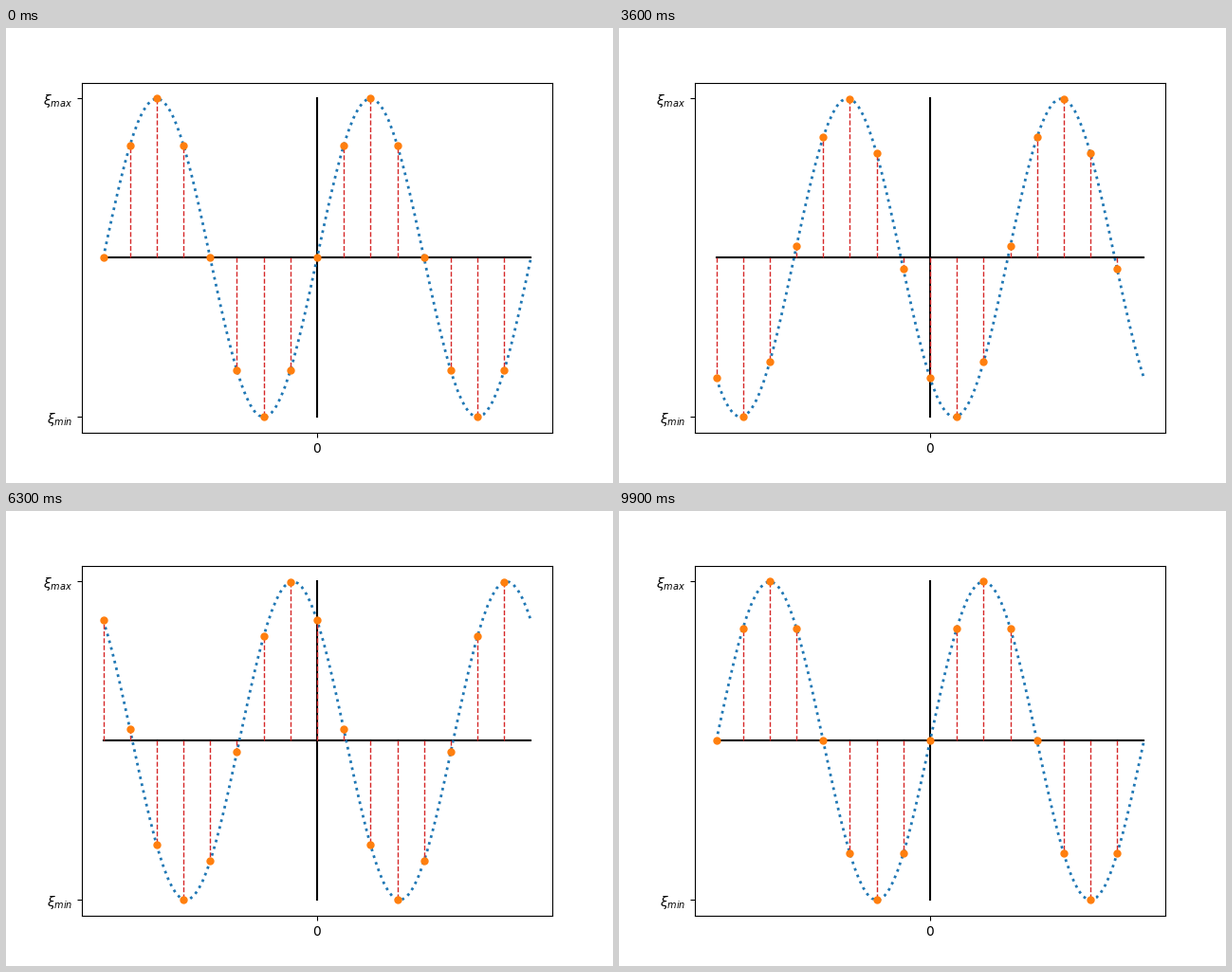
These frames come from a looping animation (640x480 px, 10 s). A matplotlib script:

```python
import numpy as np
import matplotlib.pyplot as plt
from matplotlib.animation import FuncAnimation

FRAMES = 100
END = 2 * np.pi

x = np.linspace(-END, END, 100)
xs = np.arange(16) * np.pi / 4 - END  # sample positions
phases = np.linspace(0, 2 * np.pi, FRAMES)

fig, ax = plt.subplots(figsize=(6.4, 4.8), dpi=100)
ax.set_xlim(-1.1 * END, 1.1 * END)
ax.set_ylim(-1.1, 1.1)
ax.set_xticks([0], ["0"])
ax.set_yticks([-1, 1], [r"$\xi_{min}$", r"$\xi_{max}$"])

ax.plot([-END, END], [0, 0], color="k", lw=1.5)
ax.plot([0, 0], [-1, 1], color="k", lw=1.5)
wave, = ax.plot(x, np.sin(x), ":", color="C0", lw=2)
stems = ax.vlines(xs, 0, np.sin(xs), color="C3", lw=1, linestyle="--")
dots, = ax.plot(xs, np.sin(xs), "o", color="C1", ms=5)


def update(i):
    wave.set_ydata(np.sin(x - phases[i]))
    ys = np.sin(xs - phases[i])
    dots.set_ydata(ys)
    stems.set_segments([[(a, 0), (a, b)] for a, b in zip(xs, ys)])
    return wave, stems, dots


anim = FuncAnimation(fig, update, frames=FRAMES, interval=100,
                     repeat=True, repeat_delay=0)
plt.show()
```
